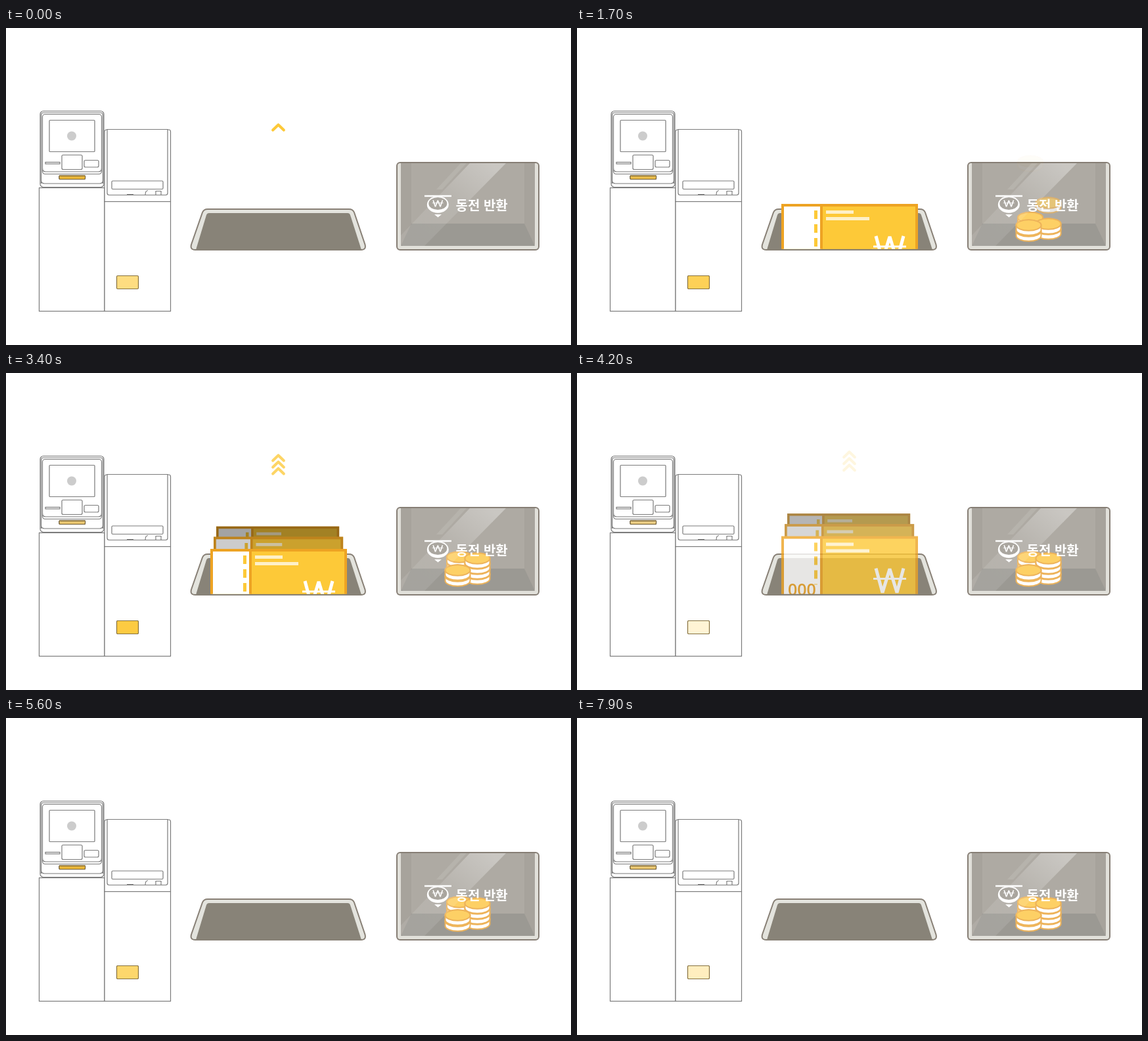
An HTML page that plays this animation: 860 by 483 pixels, repeating every 8 s.

```html
<!DOCTYPE html>
<html lang="ko">
<head>
<meta charset="utf-8">
<style>
  html, body { margin: 0; width: 100%; height: 100%; overflow: hidden; background: #fff; }
  svg { display: block; width: 100vw; height: 100vh; }
  .line { fill: #fff; stroke: #7b7b7b; stroke-width: 1.2; }
  .label { font: 700 20px "Noto Sans CJK KR", "Noto Sans CJK", sans-serif; fill: #fff; }
  .digits { font: 600 25px "Open Sans", sans-serif; fill: #eda323; }
</style>
</head>
<body>
<svg viewBox="0 0 860 483">
  <defs>
    <clipPath id="slotClip"><rect x="270" y="0" width="290" height="336.8"/></clipPath>
    <linearGradient id="shine" gradientUnits="userSpaceOnUse" x1="735" y1="206" x2="640" y2="325">
      <stop offset="0" stop-color="#fff" stop-opacity=".34"/>
      <stop offset=".5" stop-color="#fff" stop-opacity=".12"/>
      <stop offset="1" stop-color="#fff" stop-opacity=".1"/>
    </linearGradient>
    <g id="won" fill="none" stroke="#fff">
      <path d="M-21-19 L-11 18 L0-18 L11 18 L21-19" stroke-width="5" stroke-linejoin="bevel"/>
      <path d="M-25-3H25" stroke-width="3"/>
    </g>
    <!-- top left corner at 0,0 -->
    <g id="note">
      <rect x="2" y="2" width="204" height="102" fill="#fdc938"/>
      <rect x="2" y="2" width="59" height="102" fill="#fff"/>
      <path d="M52.5 10V74" stroke="#fdc938" stroke-width="5" stroke-dasharray="13 8"/>
      <path d="M68 12.5h42M68 22.5h66" stroke="#fef0c8" stroke-width="5"/>
      <use href="#won" x="165" y="68"/>
      <text class="digits" x="10" y="90">000</text>
      <path d="M61 2V104" stroke="#eda323" stroke-width="4"/>
      <rect x="2" y="2" width="204" height="102" fill="none" stroke="#eda323" stroke-width="4"/>
    </g>
    <g id="coin" stroke="#edb35a" stroke-width="2">
      <path d="M-19 0a19 8.3 0 0 1 38 0v7a19 8.3 0 0 1 -38 0z" fill="#fff"/>
      <ellipse rx="19" ry="8.3" fill="#fdd065"/>
    </g>
    <path id="chevron" d="M-8.3 10L0 2L8.3 10" fill="none" stroke="#fdc938" stroke-width="4.2" stroke-linecap="round" stroke-linejoin="round"/>
  </defs>

  <!-- machine -->
  <g class="line">
    <rect x="52" y="126.5" width="97" height="116" rx="5"/>
    <path d="M53.5 237V133q0-4 4-4h86q4 0 4 4v104" />
    <path d="M53.5 222v10q0 5 5 5h84q5 0 5-5v-10"/>
    <rect x="55.5" y="131.5" width="90" height="91" rx="4"/>
    <path d="M55.5 214q0 5 5 5h80q5 0 5-5" fill="none"/>
    <rect x="66" y="140.5" width="69" height="48" rx="1"/>
    <rect x="60" y="204.5" width="22" height="2.5"/>
    <rect x="85" y="193.5" width="31" height="22" rx="2"/>
    <rect x="119" y="201.5" width="22" height="10.5" rx="2"/>
    <rect x="50.5" y="243.5" width="99.5" height="188"/>
    <path d="M150 264.5V158q0-3 3-3h95q2.500 0 2.500 3V264.500z"/>
    <path d="M154 154.500h92v97q0 3-3 3h-86q-3 0-3-3z"/>
    <rect x="161" y="233" width="78" height="12.500" rx="1.500"/>
    <path d="M184 253.500h10M212 254q0-6 4-6.500M228 254.500v-6h8v6" fill="none"/>
    <rect x="150" y="264.500" width="100.500" height="167"/>
  </g>
  <circle cx="100" cy="164.500" r="7" fill="#ccc"/>
  <rect x="81" y="224.800" width="39.500" height="5.500" rx="1" class="line"/>
  <rect id="billLight" x="81" y="224.800" width="39.500" height="5.500" rx="1" fill="#fbc02d"/>
  <rect x="81" y="224.800" width="39.500" height="5.500" rx="1" fill="none" stroke="#7c6840" stroke-width="1.300"/>
  <path d="M82.500 226.700h36.500" stroke="#7c6840" stroke-width=".6"/>
  <rect id="coinLight" x="168.500" y="377.500" width="33" height="20" rx="1.500" fill="#fdc938"/>
  <rect x="168.500" y="377.500" width="33" height="20" rx="1.500" fill="none" stroke="#85713f" stroke-width="1.200"/>

  <!-- note tray -->
  <path d="M307 276H522q6 0 8 5L546.500 330q2 8-6 8H288q-8 0-6-8L299 281q2-5 8-5z" fill="#e3e3dd" stroke="#877f75" stroke-width="2"/>
  <path d="M309 282H520q3 0 4 3L541 338H289L305 285q1-3 4-3z" fill="#888378"/>
  <g clip-path="url(#slotClip)"><g id="notes"></g></g>

  <!-- coin box -->
  <rect x="595" y="205" width="216" height="133" rx="5" fill="#e1e0da" stroke="#867e75" stroke-width="2"/>
  <path d="M601 206H805V329q0 3-3 3H604q-3 0-3-3z" fill="#a7a39c"/>
  <rect x="617" y="206" width="172" height="92" fill="#aeaaa3"/>
  <path d="M617 298H789L805 332H601z" fill="#9b9993"/>
  <g id="coins"></g>
  <path d="M706 206H761L637 332H604L601 329V316z" fill="url(#shine)"/>
  <path d="M692 206h9L664 246h-9z" fill="#fff" opacity=".1"/>
  <path d="M637 256H678" stroke="#fff" stroke-width="2.400"/>
  <ellipse cx="657.300" cy="269" rx="16.500" ry="12.800" fill="#fff"/>
  <ellipse cx="657.300" cy="267.500" rx="14" ry="9.500" fill="#aaa69f"/>
  <use href="#won" transform="translate(657.300 267.500) scale(.34 .27)"/>
  <path d="M652 284H663L657.500 288.500z" fill="#fff"/>
  <text class="label" x="684.500" y="278">동전 반환</text>

  <g id="arrows"></g>
</svg>
<script>
const $ = id => document.getElementById(id);
const clamp = v => Math.max(0, Math.min(1, v));
const easeOut = p => 1 - (1 - p) ** 2;
// triangle wave between 0 and 1
const pulse = (t, peak) => {
  const d = (t - peak + 19000) % 1900;
  return Math.abs(d - 950) / 950;
};

// back to front: x, y, scale, shade, start, duration
const notes = [
  [320, 233.5, .9, .36, 2500, 950],
  [316, 249.5, .948, .2, 1300, 1000],
  [311, 268, 1, 0, 100, 1000]
];
$('notes').innerHTML = notes.map(([, , , shade]) =>
  `<g><use href="#note"/><rect width="208" height="106" opacity="${shade}"/></g>`).join('');

// x, y of lowest coin, layer height, drop turns
const coins = [
  [690, 297.5, 8.5, [2, 5, 7]],
  [717.5, 306.5, 8, [0, 3, 6, 8]],
  [687.5, 309.5, 9, [1, 4]]
].flatMap(([x, y, step, turns]) =>
  turns.map((turn, i) => ({ x, y: y - i * step, start: 290 + turn * 200 })));
$('coins').innerHTML = '<use href="#coin"/>'.repeat(coins.length);
$('arrows').innerHTML = [20, 10, 0].map(y => `<use href="#chevron" x="414.500" y="${y}"/>`).join('');

function draw(t) {
  $('billLight').setAttribute('opacity', pulse(t, 3750));
  $('coinLight').setAttribute('opacity', pulse(t, 3450));

  notes.forEach(([x, y, scale, , start, length], i) => {
    const drop = 72 * (1 - easeOut(clamp((t - start) / length)));
    const el = $('notes').children[i];
    el.setAttribute('transform', `translate(${x} ${y + drop}) scale(${scale})`);
    el.setAttribute('visibility', t < start ? 'hidden' : 'visible');
  });
  const leave = clamp((t - 4000) / 1000);
  $('notes').setAttribute('transform', `translate(0 ${-97 * leave})`);
  $('notes').setAttribute('opacity', 1 - leave);

  coins.forEach(({ x, y, start }, i) => {
    const p = clamp((t - start) / 300);
    const el = $('coins').children[i];
    el.setAttribute('transform', `translate(${x} ${y - 80 * (1 - p)})`);
    el.setAttribute('opacity', p);
  });

  const phase = t % 2900;
  const rise = clamp((phase - 200) / 1300);
  $('arrows').setAttribute('transform', `translate(0 ${125.5 - 8.5 * rise})`);
  $('arrows').setAttribute('opacity', 1 - rise);
  [...$('arrows').children].forEach((el, i) =>
    el.setAttribute('visibility', phase >= i * 100 ? 'visible' : 'hidden'));
}

function tick() {
  // ten steps a second
  draw(Math.floor(performance.now() % 8000 / 100) * 100);
  requestAnimationFrame(tick);
}
tick();
</script>
</body>
</html>
```
